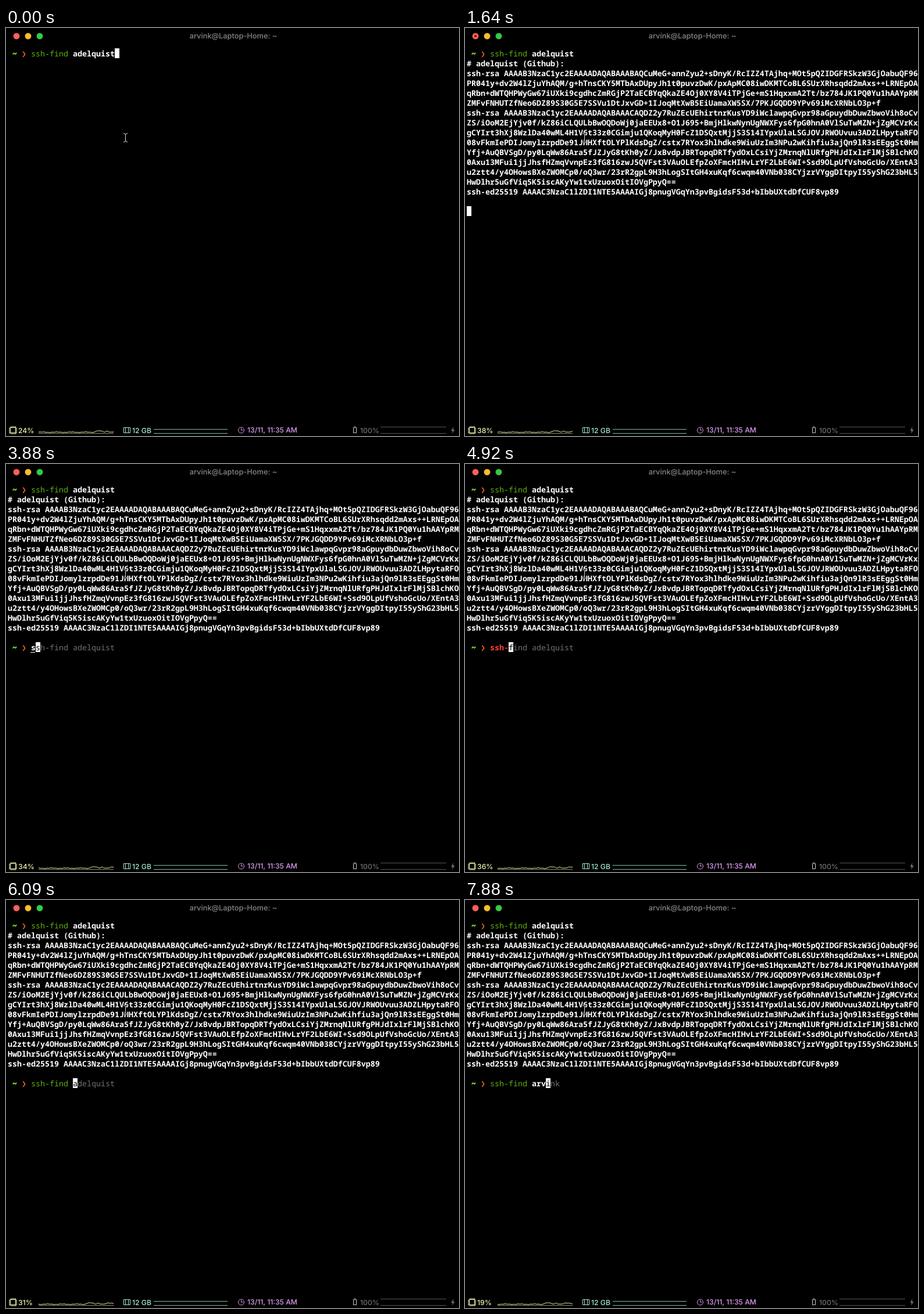
Write an HTML page that moves like this. It is 779 by 703 pixels and loops after 8 s.

```html
<!DOCTYPE html>
<html lang="en">
<head>
<meta charset="utf-8">
<title>Terminal</title>
<style>
html, body { margin: 0; width: 100%; height: 100%; overflow: hidden; background: #000; }
svg { display: block; }
text { white-space: pre; text-rendering: geometricPrecision; }
.term { font: 600 13.333px "Noto Sans Mono", "DejaVu Sans Mono", monospace; }
.ui { font: 500 12.2px Inter, Roboto, sans-serif; }
#title { font-size: 12.8px; }
.line { fill: none; stroke-width: 1; }
</style>
</head>
<body>
<svg width="779" height="703" viewBox="0 0 779 703">
  <rect width="779" height="703"/>
  <g stroke="#000" stroke-opacity=".15">
    <circle cx="18" cy="14" r="5.5" fill="#fe5f58"/>
    <circle cx="38" cy="14" r="5.5" fill="#f9bc2f"/>
    <circle cx="58" cy="14" r="5.5" fill="#37c940"/>
  </g>
  <circle id="dot" cx="18" cy="14" r="2" fill="#5c0804"/>
  <text id="title" class="ui" x="391" y="18" text-anchor="middle" fill="#858585"></text>

  <g id="screen" class="term"></g>

  <g class="line">
    <path id="beam" d="M202 181.5q3.5 0 3.5 3v9q0 3 -3.5 3M209 181.5q-3.5 0 -3.5 3v9q0 3 3.5 3"/>
    <use href="#beam" stroke="#000" stroke-width="2.4"/>
    <use href="#beam" stroke="#ddd"/>
  </g>

  <g class="line" stroke="#f2f3ae">
    <rect x="7.5" y="688.5" width="9" height="9"/>
    <path d="M8 687h9M8 699h9M6 689v9M18 689v9" stroke-dasharray="1 1" stroke-width="2"/>
    <path d="M56 698.5h129" stroke="#8b8c62"/>
    <polyline id="graph"/>
  </g>
  <text id="cpu" class="ui" x="21" y="697.5" fill="#f2f3ae"></text>

  <g class="line" stroke="#a2ecd0">
    <path d="M202.5 688.5h11v9h-11zM205.5 688v10M210.5 688v10"/>
    <path d="M254 691.5h127M254 698.5h127" stroke="#7fbca6"/>
  </g>
  <text class="ui" x="217" y="697.5" fill="#a2ecd0">12 GB</text>

  <path class="line" d="M399.5 693a5 5 0 1 0 10 0a5 5 0 1 0 -10 0M404.5 689.5v3.5h3" stroke="#dc9cf0"/>
  <text class="ui" x="415" y="697" fill="#dc9cf0">13/11, 11:35 AM</text>

  <path class="line" d="M597.5 688.5h5v9h-5zM599 686.5h2" stroke="#d0d0d0"/>
  <text class="ui" x="609" y="697.5" fill="#707070">100%</text>
  <path class="line" d="M644 687.5h113M644 698.5h113" stroke="#555"/>
  <path d="M769.5 687l-4 7h2.5l-1 5l4.5 -7h-2.7z" fill="#707070"/>
</svg>

<script>
const LOOP = 8000;
const USER = "arvink", FRIEND = "adelquist";
const COMMAND = "ssh-find ";
const GREEN = "#5cb00c", RED = "#ff4036", GREY = "#707070", WHITE = "#fff";
const OUTPUT = [
  `# ${FRIEND} (Github):`,
  "ssh-rsa AAAAB3NzaC1yc2EAAAADAQABAAABAQCuMeG+annZyu2+sDnyK/RcIZZ4TAjhq+MOt5pQZIDGFRSkzW3GjOabuQF96",
  "PR041y+dv2W4lZjuYhAQM/g+hTnsCKY5MTbAxDUpyJh1t0puvzDwK/pxApMC08iwDKMTCoBL6SUrXRhsqdd2mAxs++LRNEpOA",
  "qRbn+dWTQHPWyGw67iUXki9cgdhcZmRGjP2TaECBYqQkaZE4Oj0XY8V4iTPjGe+mS1HqxxmA2Tt/bz784JK1PQ0Yu1hAAYpRM",
  "ZMFvFNHUTZfNeo6DZ89S30G5E7SSVu1DtJxvGD+1IJoqMtXwB5EiUamaXW5SX/7PKJGQDD9YPv69iMcXRNbLO3p+f",
  "ssh-rsa AAAAB3NzaC1yc2EAAAADAQABAAACAQDZ2y7RuZEcUEhirtnrKusYD9iWclawpqGvpr98aGpuydbDuwZbwoVih8oCv",
  "ZS/iOoM2EjYjv0f/kZ86iCLQULbBwOQDoWj0jaEEUx8+O1J695+BmjHlkwNynUgNWXFys6fpG0hnA0VlSuTwMZN+jZgMCVrKx",
  "gCYIrt3hXj8WzlDa40wML4H1V6t33z0CGimju1QKoqMyH0FcZ1DSQxtMjjS3S14IYpxUlaLSGJOVJRWOUvuu3ADZLHpytaRFO",
  "08vFkmIePDIJomylzrpdDe91JHHXftOLYPlKdsDgZ/cstx7RYox3hlhdke9WiuUzIm3NPu2wKihfiu3ajQn9lR3sEEggSt0Hm",
  "Yfj+AuQBVSgD/py0LqWw86Ara5fJZJyG8tKh0yZ/JxBvdpJBRTopqDRTfydOxLCsiYjZMrnqNlURfgPHJdIxlrFlMjSBlchKO",
  "0Axu13MFui1jjJhsfHZmqVvnpEz3fG816zwJ5QVFst3VAuOLEfpZoXFmcHIHvLrYF2LbE6WI+Ssd9OLpUfVshoGcUo/XEntA3",
  "u2ztt4/y4OHowsBXeZWOMCp0/oQ3wr/23rR2gpL9H3hLogSItGH4xuKqf6cwqm40VNb038CYjzrVYggDItpyI55yShG23bHL5",
  "HwDlhr5uGfViq5K5iscAKyYw1txUzuoxOitIOVgPpyQ==",
  "ssh-ed25519 AAAAC3NzaC1lZDI1NTE5AAAAIGj8pnugVGqYn3pvBgidsF53d+bIbbUXtdDfCUF8vp89",
];
// [time, value]: characters typed at the second prompt, and CPU load
const TYPED = [[0, 0], [3880, 1], [4030, 3], [4920, 4], [5360, 5], [5510, 7],
  [5650, 8], [5800, 9], [7440, 10], [7580, 11], [7880, 12]];
const LOAD = [[0, 24], [150, 26], [1190, 38], [2240, 38], [3130, 34],
  [4180, 36], [5220, 33], [6090, 31], [7140, 19]];
const SAMPLES = 60;

const $ = id => document.getElementById(id);
const stepAt = (steps, t) => steps.findLastIndex(s => s[0] <= t);

// CPU history: low ripple with a few bumps, followed by the listed loads
const loads = Array.from({ length: SAMPLES - 1 }, (_, i) => {
  const bump = (at, size) => size * Math.exp(-(((i - at) / 1.6) ** 2));
  return 19 + 4 * Math.sin(i * 0.55) + 3 * Math.sin(i * 1.9) +
    bump(46, 20) + bump(49, 18) + bump(54, 20);
}).concat(LOAD.map(s => s[1]));

function put(row, col, str, fill = WHITE, weight = 600, extra = "") {
  return `<text x="${3 + 8 * col}" y="${49 + 17 * row}" fill="${fill}" style="font-weight:${weight}" ${extra}>${str}</text>`;
}
function block(row, col, char = "") {
  return `<rect x="${3 + 8 * col}" y="${35 + 17 * row}" width="8" height="17" fill="#fff"/>` +
    put(row, col, char, "#000", 500);
}
const prompt = row => put(row, 1, "~", "#8cee38", 700, 'stroke="#8cee38" stroke-width=".6"') +
  put(row, 3, "❯", "#dd680e", 700);

function typing(n) {
  const row = 16, line = COMMAND + (n < 11 ? FRIEND : USER);
  if (!n) return prompt(row) + block(row, 5);
  const word = line.slice(0, Math.min(n, 8));
  const wrong = n > 3 && n < 8;
  let out = prompt(row) +
    put(row, 5, word, n == 1 ? WHITE : wrong ? RED : GREEN, n == 1 || wrong ? 700 : 500);
  if (n == 1) out += `<rect x="42" y="324" width="8" height="1" fill="#fff"/>`;
  if (n > 9) out += put(row, 14, line.slice(9, n));
  return out + block(row, 5 + n, line[n]) + put(row, 6 + n, line.slice(n + 1), GREY, 500);
}

function screen(t) {
  let out = prompt(0) + put(0, 5, "ssh-find", GREEN, 500) + put(0, 14, FRIEND);
  if (t < 590) return out + block(0, 23);
  if (t < 1640) return out + block(1, 0);
  out += OUTPUT.map((line, i) => put(i + 1, 0, line)).join("");
  return out + (t < 1790 ? block(16, 0) : typing(TYPED[stepAt(TYPED, t)][1]));
}

let shown = "";
function draw(now) {
  const t = now % LOOP;
  const load = stepAt(LOAD, t);
  const next = screen(t);
  if (next != shown) $("screen").innerHTML = shown = next;
  $("title").textContent = t >= 590 && t < 1640 ? COMMAND + FRIEND : USER + "@Laptop-Home: ~";
  $("dot").style.display = t >= 1340 && t < 2380 ? "" : "none";
  $("cpu").textContent = LOAD[load][1] + "%";
  $("graph").setAttribute("points", loads.slice(load, load + SAMPLES)
    .map((v, i) => `${56 + i * 129 / (SAMPLES - 1)},${698.5 - v * 0.11}`).join(" "));
  requestAnimationFrame(() => draw(performance.now()));
}
draw(0);
</script>
</body>
</html>
```
